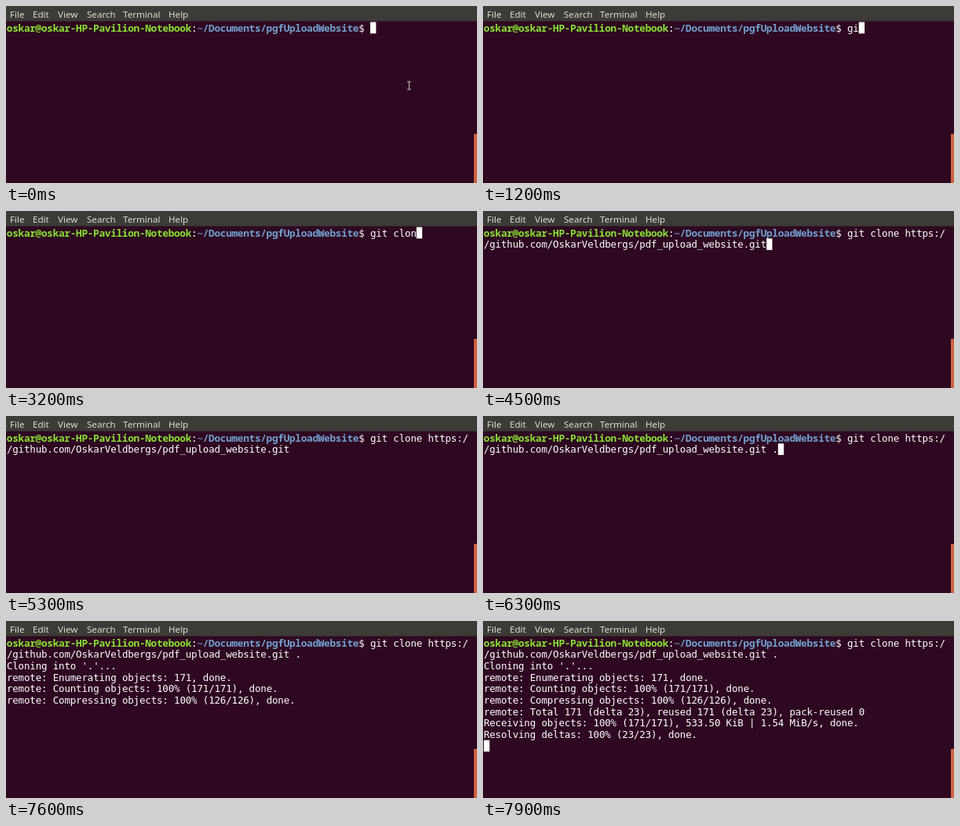
An HTML page with a canvas for the animation above (8 s loop, 600 by 227 pixels).

```html
<!DOCTYPE html>
<html lang="en">
<head>
<meta charset="utf-8">
<title>Terminal: git clone</title>
<style>
  html, body { margin: 0; width: 600px; height: 227px; overflow: hidden; background: #2e0821; }
  canvas { display: block; }
</style>
</head>
<body>
<canvas id="stage" width="600" height="227"></canvas>
<script>
const ctx = document.getElementById('stage').getContext('2d');
const LOOP = 8000, BLINK = 600;
const COLS = 80, CELL_W = 7.35, CELL_H = 14.69, LEFT = 1, TOP = 20.6, BASELINE = 12;
const WHITE = '#ffffff', GREEN = '#8ae234', BLUE = '#729fcf';
const REGULAR = '12.5px "DejaVu Sans Mono", monospace';
const BOLD = '600 12.8px "Noto Sans Mono", monospace';

const MENU = [['File', 5], ['Edit', 34], ['View', 66], ['Search', 103], ['Terminal', 149], ['Help', 207]];

const PROMPT = [
  ['oskar@oskar-HP-Pavilion-Notebook', GREEN, BOLD],
  [':', WHITE, REGULAR],
  ['~/Documents/pgfUploadWebsite', BLUE, BOLD],
  ['$ ', WHITE, REGULAR]
];

// Key presses and pasted text: [time, text]
const KEYS = [
  [1000, 'g'], [1200, 'i'], [1500, 't'], [2100, ' '],
  [2500, 'c'], [2700, 'l'], [2900, 'o'], [3100, 'n'], [3300, 'e'], [3400, ' '],
  [4200, 'https://github.com/OskarVeldbergs/pdf_upload_website.git'],
  [5700, ' '], [5900, '.'], [6500, '\n']
];

const OUTPUT = [
  [6500, "Cloning into '.'...\n"],
  [7500, 'remote: Enumerating objects: 171, done.\n'],
  [7500, 'remote: Counting objects: 100% (171/171), done.\n'],
  [7600, 'remote: Compressing objects: 100% (126/126), done.\n'],
  [7700, 'remote: Total 171 (delta 23), reused 171 (delta 23), pack-reused 0\n'],
  [7700, 'Receiving objects: 100% (171/171), 533.50 KiB | 1.54 MiB/s, done.\n'],
  [7700, 'Resolving deltas: 100% (23/23), done.\n']
];

function textAt(events, time) {
  return events.filter(([at]) => at <= time).map(([, text]) => text).join('');
}

function cursorVisible(time) {
  // The blink restarts with every key press.
  const last = KEYS.reduce((latest, [at]) => at <= time ? at : latest, -500);
  return Math.floor((time - last) / BLINK) % 2 === 0;
}

function drawMenu() {
  ctx.fillStyle = '#3c3b37';
  ctx.fillRect(0, 0, 600, 19.5);
  ctx.font = '11.6px "Noto Sans", "Open Sans", sans-serif';
  ctx.fillStyle = '#dfdbd2';
  ctx.textAlign = 'left';
  for (const [label, x] of MENU) ctx.fillText(label, x, 14.5);
}

function drawRuns(runs) {
  let col = 0, row = 0;
  ctx.textAlign = 'center';
  for (const [text, color, font] of runs) {
    ctx.font = font;
    ctx.fillStyle = color;
    for (const char of text) {
      if (char === '\n') {
        col = 0;
        row++;
        continue;
      }
      if (col === COLS) {
        col = 0;
        row++;
      }
      ctx.fillText(char, LEFT + (col + 0.5) * CELL_W, TOP + row * CELL_H + BASELINE);
      col++;
    }
  }
  return { col, row };
}

function drawCursor({ col, row }) {
  ctx.fillStyle = WHITE;
  ctx.fillRect(LEFT + col * CELL_W, TOP + row * CELL_H, CELL_W, CELL_H);
}

function drawPointer(x, y) {
  ctx.fillStyle = '#c9bfc6';
  ctx.fillRect(x - 0.5, y - 5, 1, 10);
  ctx.fillRect(x - 2.5, y - 5.5, 5, 1);
  ctx.fillRect(x - 2.5, y + 4.5, 5, 1);
}

function draw(time) {
  ctx.fillStyle = '#2e0821';
  ctx.fillRect(0, 0, 600, 227);
  drawMenu();
  ctx.fillStyle = '#cf6240';
  ctx.fillRect(596, 164, 4, 63);

  const typed = textAt(KEYS, time) + textAt(OUTPUT, time);
  const end = drawRuns([...PROMPT, [typed, WHITE, REGULAR]]);
  if (cursorVisible(time)) drawCursor(end);
  if (time < KEYS[0][0]) drawPointer(513.5, 102);
}

function tick() {
  draw(performance.now() % LOOP);
  requestAnimationFrame(tick);
}
tick();
</script>
</body>
</html>
```
